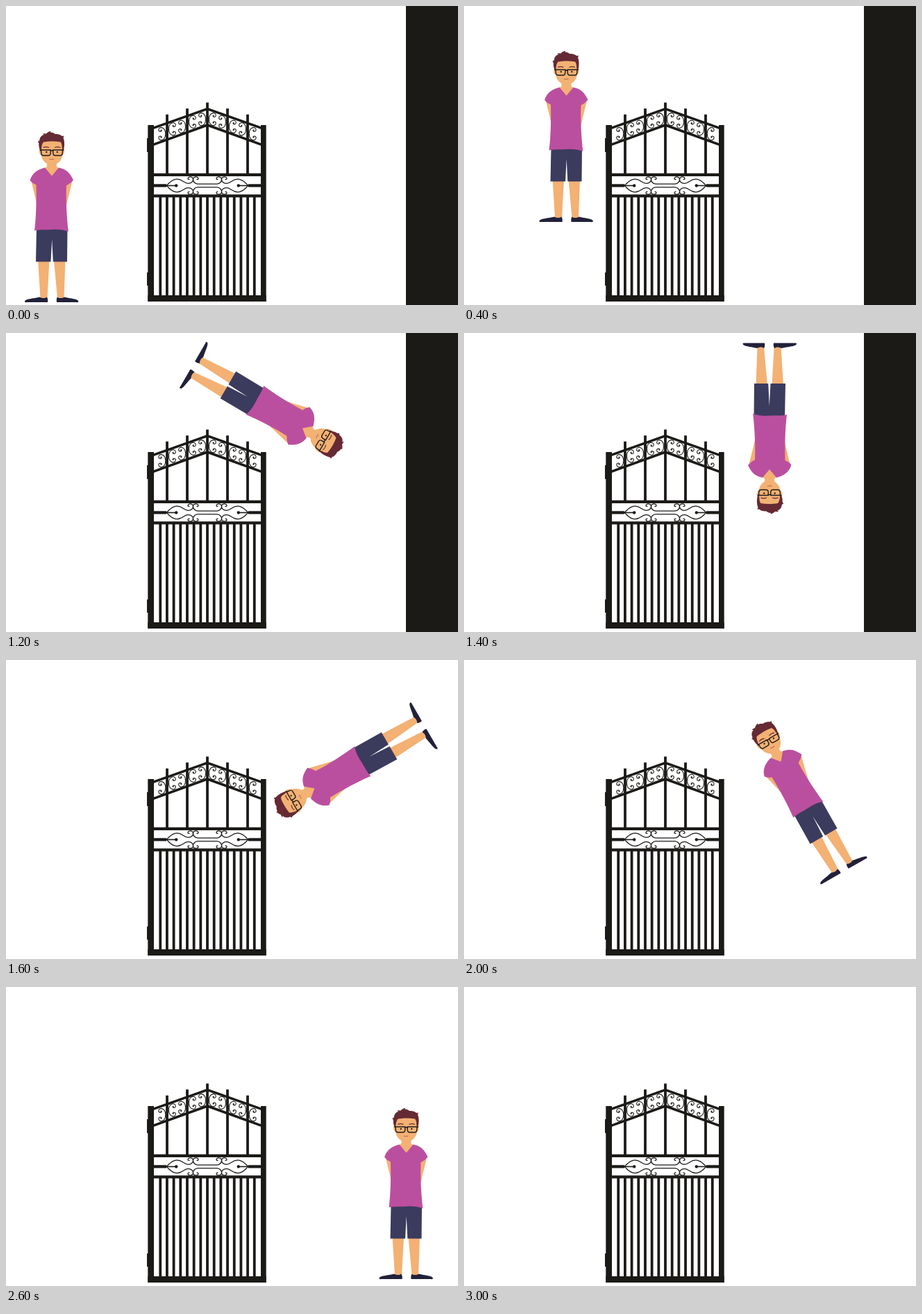
An HTML page with a canvas for the animation above (3200 ms loop, 651x432 px).

```html
<!DOCTYPE html>
<html lang="en">
<head>
<meta charset="utf-8">
<title>Over the gate</title>
<style>
html, body { margin: 0; width: 100%; height: 100%; overflow: hidden; background: #fff; }
canvas { display: block; }
</style>
</head>
<body>
<canvas id="stage" width="651" height="432"></canvas>
<script>
const ctx = document.getElementById('stage').getContext('2d');
const LOOP = 3200, STEP = 200;
const IRON = '#1b1a17', SKIN = '#f3b173', SHIRT = '#bb4f9f', SHORTS = '#3b3b5e', SHOE = '#21213a', HAIR = '#652a34';

// Body centre and turn in degrees for every step of the leap
const poses = [
  [66, 304.5, 0], [147.5, 304.5, 0], [147.5, 188.5, 0], [164, 161, 30],
  [209, 114.5, 60], [288.5, 106, 90], [376, 108, 120], [440, 138, 180],
  [495.5, 156, 240], [494.5, 155.5, 300], [486, 198, 330], [486.5, 211.5, 0]
];
const WALK_FROM = 12, WALL_UNTIL = 8;

function pose(i) {
  return i < WALK_FROM ? poses[i] : [486.5 + 90 * (i - WALK_FROM), 298.5, 0];
}

function fill(color, d) {
  ctx.fillStyle = color;
  ctx.fill(new Path2D(d));
}

function stroke(width, d, color = IRON) {
  ctx.lineWidth = width;
  ctx.strokeStyle = color;
  ctx.stroke(new Path2D(d));
}

function dot(x, y, r, color = IRON) {
  ctx.fillStyle = color;
  ctx.beginPath();
  ctx.arc(x, y, r, 0, Math.PI * 2);
  ctx.fill();
}

function box(x0, y0, x1, y1) {
  ctx.fillStyle = IRON;
  ctx.fillRect(x0, y0, x1 - x0, y1 - y0);
}

function scaled(x, y, sx, sy, draw) {
  ctx.save();
  ctx.translate(x, y);
  ctx.scale(sx, sy);
  draw();
  ctx.restore();
}

// C-shaped scroll bulging at x, opening towards dir
function scroll(x, y, dir) {
  for (const s of [-1, 1]) {
    scaled(x, y, dir, s, () => {
      stroke(1.1, 'M5.8 4.6C6 2.6 10 2.8 9.8 6C9.4 10.8 0 10.6 0 0');
      dot(6.2, 5, 1.1);
    });
  }
}

// One quarter of the middle ornament, seen from the gate's centre
function ornament() {
  stroke(1.3, 'M-59 0C-55 -3 -52 -9 -44 -9.3C-36 -9.5 -34 -3.4 -28 -3.2C-23 -3 -20 -6 -20.5 -9.5C-21 -13 -27 -14 -28 -10.5C-28.3 -9 -26.5 -8.3 -25.6 -9.4');
  stroke(1.3, 'M0 -2.4H-14C-18 -2.6 -21 -6 -20.5 -9.5C-20 -13 -14 -14 -13 -10.5C-12.7 -9 -14.5 -8.3 -15.4 -9.4');
}

function gate() {
  box(204.3, 172, 213, 427);
  box(367, 172, 374.7, 427);
  box(204.3, 418, 374.7, 427);
  box(203, 191, 206, 211);
  box(203, 385, 206, 404);
  box(213, 241.7, 367, 246);
  box(213, 272.3, 367, 276.5);
  for (let i = -7; i <= 7; i++) {
    const x = 290 + i * 9.68;
    box(x - 1.9, 276, x + 1.9, 419);
  }
  for (let i = -2; i <= 2; i++) {
    const x = 290 + i * 29;
    box(x - 1.9, 139.5 + Math.abs(i) * 8.6, x + 1.9, 243);
  }
  stroke(3.6, 'M212 176.4L290 148.6L368 176.4M212 200.4L290 172L368 200.4');

  for (const side of [-1, 1]) {
    scaled(290, 0, side, 1, () => {
      const slope = 28 / 77;
      for (const [x, dir] of [[2.5, 1], [26.5, -1], [31.5, 1], [55.5, -1], [60.3, 1]]) {
        scroll(x, 160.2 + (x + dir * 7) * slope, dir);
      }
      box(59, 257.3, 78, 261.6);
      box(45, 258.7, 60, 260.3);
      dot(44.8, 259.5, 2.2);
    });
    for (const up of [-1, 1]) scaled(290, 259.5, side, up, ornament);
  }
}

function man(x, y, deg) {
  ctx.save();
  ctx.translate(x, y);
  ctx.rotate(deg * Math.PI / 180);
  ctx.translate(-66, -304.5);

  // legs and shoes
  fill(SKIN, 'M46 367H62.5L59.5 422H49.5ZM69 367H85.5L83.5 422H74Z');
  fill(SHOE, 'M27 427C27 423 39 423 48.5 420.5C52 422.5 56 422.5 58.8 420.5C60.5 423 60.5 426 60 428H30Q27 428.5 27 427ZM73.8 420.5C76 422.5 81 422.5 84 420.5C93 423 104.5 423 104.5 427Q104.5 428.5 101 428H73.2C72.5 426 72.6 423 73.8 420.5Z');
  fill(SHORTS, 'M44 320H88.5L88 369.5H67.8L66.2 337L64.5 369.5H43Z');

  // arms, neck, shirt
  fill(SKIN, 'M36 251L45 248V286C43.5 284 43 281 42.5 278ZM96 251L86 248V290C88 286 88.5 282 89 279Z');
  fill(SKIN, 'M59 222H73V232L77 235L66 247L55 235L59 232Z');
  fill(SHIRT, 'M56 233.5L66 245.5L76 233.5C86 236 91 239 97 251.5Q92.5 257 87 259.5C86 280 87.5 305 89.8 326C82 323 76 322.5 66 323C56 323.5 49 322.5 41 324.5C43.5 305 44 280 43.5 258.5Q38 256.5 34.6 252C38 240 47 236 56 233.5Z');

  // head
  fill(SKIN, 'M49.5 206C47 205 46.8 214 50.5 215C51.5 223 58 230 66 230C74 230 80.5 223 81.5 215C85 214 84.8 205 82.5 206L81 194H51Z');
  fill(HAIR, 'M49.8 210C47.8 206 47 202 47.3 198L45.8 196L48.2 194.5C48.5 190 51 187 54.5 186L52.8 184.2L58 184.4C60 182.5 62 181.5 64.5 180.8L64 182.5C67 182.7 69 183.6 70.5 185C75 184.5 79 186 81 188L83.5 187.6L82.6 190.5C84.8 196 84.5 204 82.2 210L80.6 205C80.8 201 80 198.5 78.5 196.5C70 194.8 61 195.5 54 196.5C52 199 51.2 203 51 206Z');
  stroke(1.1, 'M53.5 204.5Q57.5 202.8 62 204.5M70 204.5Q74.5 202.8 78.5 204.5', HAIR);
  dot(58.3, 211, 1.2, '#33241f');
  dot(73.8, 211, 1.2, '#33241f');
  stroke(1.4, 'M50.5 208H64.2V213Q64 216 61 216H54Q51 216 50.8 213ZM67.8 208H81.5L81.2 213Q81 216 78 216H71Q68 216 67.8 213ZM64.2 209.3Q66 208.3 67.8 209.3M48.8 208H51M81 208H83.3', '#201d1c');
  stroke(1, 'M62.5 221.3Q66 222.3 69 221.2', '#b5614c');
  ctx.restore();
}

function draw(now) {
  const i = Math.floor((now % LOOP) / STEP);
  ctx.fillStyle = '#fff';
  ctx.fillRect(0, 0, 651, 432);
  if (i < WALL_UNTIL) box(576, 0, 651, 432);
  gate();
  man(...pose(i));
}

let start;
function tick(now) {
  if (start === undefined) start = now;
  draw(Math.max(0, now - start));
  requestAnimationFrame(tick);
}
draw(0);
requestAnimationFrame(tick);
</script>
</body>
</html>
```
